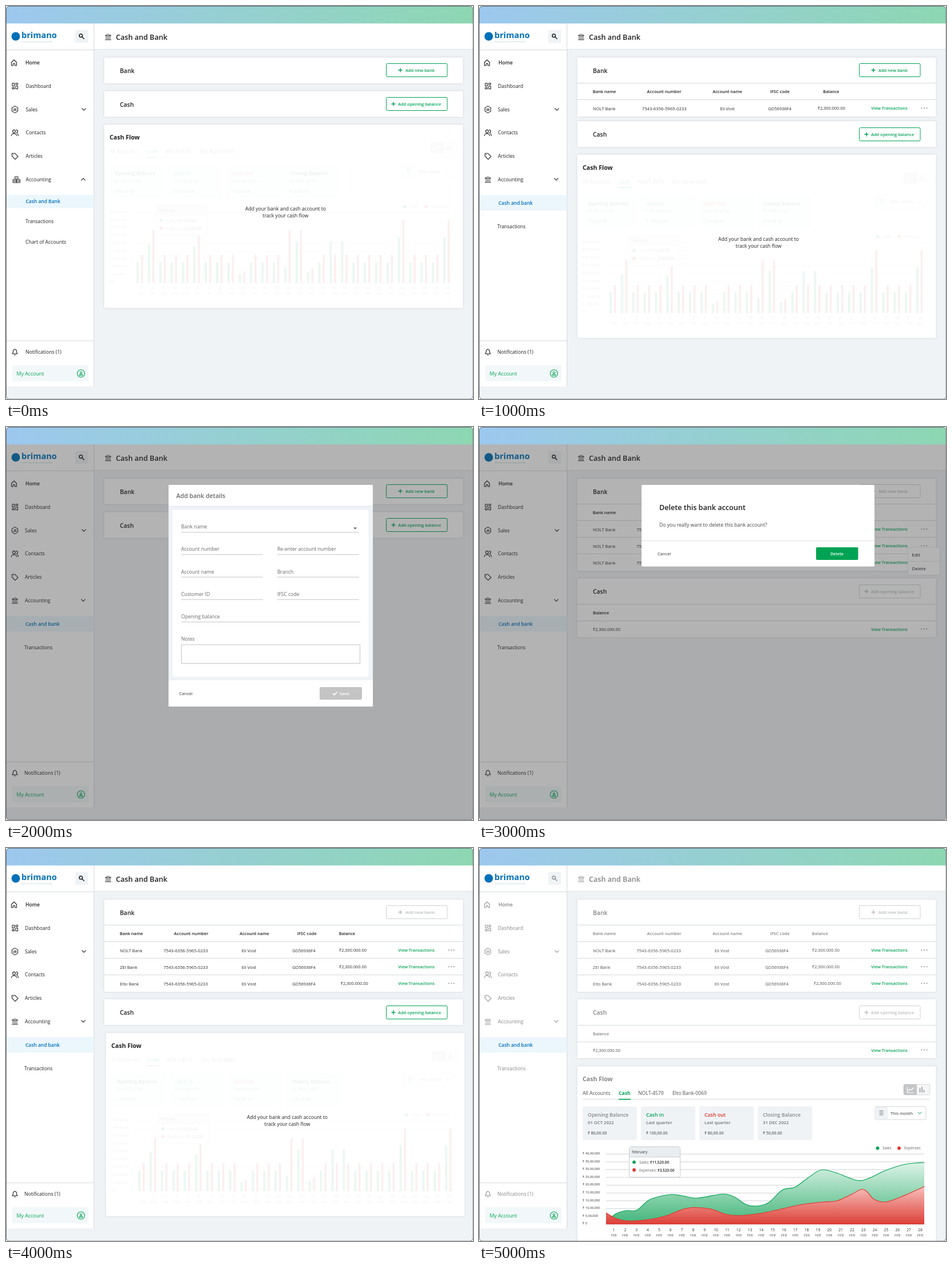
Recreate the animation shown at these times as an HTML page. Size 816 px wide and 686 px high, loop 6000 ms.

```html
<!DOCTYPE html>
<html lang="en">
<head>
<meta charset="utf-8">
<title>Cash and Bank</title>
<style>
html, body { margin: 0; width: 100%; height: 100%; overflow: hidden; background: #fff; }
svg { display: block; width: 816px; height: 686px; font-family: "Open Sans", "Noto Sans", sans-serif; }
.scene { --ink: #1f1f1f; --body: #2c2c2c; --line: #1f1f1f; }
.pale { --ink: #858585; --body: #505050; --line: #959595; }
.card { fill: #fff; filter: drop-shadow(0 .5px 1.5px rgba(40, 60, 80, .2)); }
.icon { fill: none; stroke: var(--line); stroke-width: 1.1; stroke-linejoin: round; stroke-linecap: round; }
</style>
</head>
<body>
<svg id="stage" viewBox="0 0 816 686">
  <defs>
    <linearGradient id="top"><stop stop-color="#9dc8ef"/><stop offset="1" stop-color="#8dd7b2"/></linearGradient>
    <linearGradient id="sales" gradientUnits="userSpaceOnUse" x1="0" y1="168" x2="0" y2="268">
      <stop stop-color="#dcf3e7"/><stop offset="1" stop-color="#4cb981"/>
    </linearGradient>
    <linearGradient id="spend" gradientUnits="userSpaceOnUse" x1="0" y1="208" x2="0" y2="276">
      <stop stop-color="#f7c4c0"/><stop offset="1" stop-color="#dc3f36"/>
    </linearGradient>
  </defs>
</svg>
<script>
const GREEN = '#00a353', RED = '#e1342d', BLUE = '#0070b8', INK = 'var(--ink)', BODY = 'var(--body)';
const BG = '#f0f3f6', LINE = '#d5d9dc', OFF = '#b9bcbe';
const BANKS = ['NOLT Bank', 'ZEI Bank', 'Elto Bank'];
const STEP = 1000;

const text = (x, y, s, size = 8.6, fill = INK, weight = 400, anchor = 'start') =>
  `<text x="${x}" y="${y + size * .36}" font-size="${size}" fill="${fill}" font-weight="${weight}" text-anchor="${anchor}">${s}</text>`;
const mid = (x, y, s, size, fill, weight) => text(x, y, s, size, fill, weight, 'middle');
const rect = (x, y, w, h, fill, more = '') => `<rect x="${x}" y="${y}" width="${w}" height="${h}" fill="${fill}" ${more}/>`;
const card = (x, y, w, h) => rect(x, y, w, h, '#fff', 'rx="1.5" class="card"');
const rule = (x, y, w, color = LINE) => rect(x, y - .5, w, 1, color);
const dot = (x, y, r, fill) => `<circle cx="${x}" cy="${y}" r="${r}" fill="${fill}"/>`;
const path = (d, stroke, width = 1.2, fill = 'none') =>
  `<path d="${d}" fill="${fill}" stroke="${stroke}" stroke-width="${width}" stroke-linecap="round" stroke-linejoin="round"/>`;
const list = (n, f) => Array.from({ length: n }, (_, i) => f(i)).join('');

// Icon paths are centred on 0,0.
const ICONS = {
  home: 'M-4.5 -.5 0-5 4.5-.5V5H1.5V1.5H-1.5V5H-4.5Z',
  grid: 'M-4.5-5H-1V0H-4.5ZM1.5-5H5V-2.5H1.5ZM1.5 0H5V5H1.5ZM-4.5 2.5H-1V5H-4.5Z',
  sales: 'M0-6 5-3V3L0 6-5 3V-3ZM-2 2V0M0 2V-2M2 2V-1',
  people: 'M-1.5-5a2.4 2.4 0 1 1 0 4.8a2.4 2.4 0 1 1 0-4.8M-6 5C-6 0 3 0 3 5M2.5-5a2.4 2.4 0 0 1 0 4.8M4 1Q6 2.5 6 5',
  tag: 'M-5-5H0L5.5.5 .5 5.5-5 0ZM-2.6-2.6h.1',
  bank: 'M-5-2.5 0-5 5-2.5ZM-5 5H5M-3.5-2V4.5M-1.2-2V4.5M1.2-2V4.5M3.5-2V4.5',
  coins: 'M-2.5-5.5H2.5V-.5H-2.5ZM-6-.5H0V5.5H-6ZM0-.5H6V5.5H0ZM-2.5-3H2.5M-6 1.5H6M-6 3.5H6',
  bell: 'M-4.5 3Q-3 2-3-1.5a3 3 0 0 1 6 0Q3 2 4.5 3ZM-1 5H1M0-4.5V-5.2',
  search: 'M-1.2-4a2.8 2.8 0 1 1 0 5.6a2.8 2.8 0 1 1 0-5.6M1 1 4.3 4.3',
  user: 'M0-6.5a6.5 6.5 0 1 1 0 13a6.5 6.5 0 1 1 0-13M0-3a1.6 1.6 0 1 1 0 3.2a1.6 1.6 0 1 1 0-3.2M-3 3.2Q-3 1.2 0 1.2T3 3.2Z',
  down: 'M-3.3-1.6 0 1.7 3.3-1.6',
  up: 'M-3.3 1.6 0-1.7 3.3 1.6',
  plus: 'M-3 0H3M0-3V3'
};
const FINE = 'stroke-width:.8';
const icon = (name, x, y, style = '') =>
  `<path class="icon" d="${ICONS[name]}" transform="translate(${x} ${y})" style="${style}"/>`;

function sidebar(first) {
  const x = first ? 34.5 : 33;
  const rows = [['home', 'Home'], ['grid', 'Dashboard'], ['sales', 'Sales'], ['people', 'Contacts'], ['tag', 'Articles'],
    [first ? 'coins' : 'bank', 'Accounting', FINE]];
  const menu = rows.map(([pic, name, style], i) => {
    const y = 99 + i * 40.8;
    return icon(pic, i ? (pic === 'coins' ? 18.5 : 15.5) : 14, y, style) +
      text(i ? x : 34, y, name, 8.6, INK, i ? 400 : 600);
  }).join('');
  const sub = first
    ? rect(1, 329.5, 152.5, 23, '#ebf6fd') + text(34.5, 341.3, 'Cash and Bank', 8.45, BLUE, 600) +
      text(34, 375.5, 'Transactions', 8.4) + text(34, 412, 'Chart of Accounts')
    : rect(1, 330, 152.5, 27, '#ebf6fd') + text(34, 343.8, 'Cash and bank', 8.45, BLUE, 600) +
      text(32, 384.8, 'Transactions', 8.4);
  return rect(1, 30, 152.5, 634, '#fff') + rect(153.3, 30, 1, 634, LINE) +
    dot(17, 53, 7.5, BLUE) + text(27, 50.5, 'brimano', 14.5, BLUE, 700) +
    text(27, 62, 'Handy accounts for every growing small trader', 2.5, '#4d9b96') +
    rect(121, 42, 22.5, 22.5, BG, 'rx="2"') + icon('search', 132, 53, 'stroke-width:1.5') +
    rule(1, 76.5, 152.5) + menu + icon('down', 136, 180.5) +
    icon(first ? 'up' : 'down', 135, 302.5) + sub + rule(1, 584.5, 152.5) +
    icon('bell', 15.5, 604) + text(first ? 34 : 32, 604, 'Notifications (1)') +
    rect(11, 627, 133, 28, '#f2f8f9', 'rx="2"') + text(18.5, 642, 'My Account', 8.8, GREEN, 500) +
    icon('user', 131, 641.5, `stroke:${GREEN}`);
}

function shell(first) {
  return rect(0, 30, 816, 656, BG) + rect(154, 30, 662, 45, '#fff') + rule(154, 75.5, 662, '#dfe3e6') +
    icon('bank', 178.5, 54, FINE) + text(192, 54.3, 'Cash and Bank', 12.6, INK, 600) + sidebar(first);
}

function button(x, y, label, on) {
  const color = on ? GREEN : OFF, wide = label.length > 12;
  return rect(x + .5, y + .5, 106.5, 23, '#fff', `rx="2" stroke="${on ? GREEN : '#cfd2d4'}"`) +
    icon('plus', x + (wide ? 13 : 25), y + 12, `stroke:${color};stroke-width:1.4`) +
    text(x + (wide ? 21 : 34), y + 12.4, label, 7.45, color, 600);
}

const more = y => [773.5, 778, 782.5].map(x => dot(x, y, 1, '#8d9194')).join('');
const view = y => mid(717, y, 'View Transactions', 7.35, GREEN, 600) + more(y - .5);
const sumText = (x, y) => mid(x, y, '₹2,300.000.00', 7.4, BODY);

function bank(rows, names, add) {
  const one = rows === 1, head = (x, s) => mid(x, 149.8, s, 7.45, INK, 600);
  let out = card(171.5, 90, 627, rows ? 74 + rows * 29 : 45) + text(199, 113.5, 'Bank', 10.4, INK, 600) +
    button(664, 100, 'Add new bank', add);
  if (!rows) return out;
  out += rule(171.5, 134.5, 627) + head(219, 'Bank name') + head(323.5, 'Account number') +
    head(434, 'Account name') + head(525.7, 'IFSC code') + head(one ? 615.5 : 596, 'Balance');
  return out + list(rows, i => {
    const y = 178.8 + i * 29;
    return rule(171.5, 163.5 + i * 29, 627) + text(199, y, names[i], 7.6, BODY) +
      mid(one ? 323.7 : 314, y, '7543-6356-5965-0233', 7.7, BODY) +
      mid(one ? 434 : 424.5, y, 'Eli Vost', 7.7, BODY) + mid(one ? 525.5 : 520.5, y, 'GD56936F4', 7.5, BODY) +
      sumText(one ? 615.7 : i === 2 ? 608.7 : 606, y) + view(y);
  });
}

function cash(y, open, add) {
  let out = card(171.5, y, 627, open ? 103 : 45) + text(199, y + 23.7, 'Cash', 10.4, INK, 600) +
    button(664, Math.round(y + 10.6), 'Add opening balance', add);
  if (open) out += rule(171.5, y + 45.5, 627) + text(199, y + 60.3, 'Balance', 7.45, INK, 600) +
    rule(171.5, y + 74.5, 627) + text(199, y + 89, '₹2,300.000.00', 7.4, BODY) + view(y + 89);
  return out;
}

// Catmull-Rom spline through the points.
function curve(p) {
  return p.slice(1).reduce((d, c, i) => {
    const a = p[i - 1] || p[i], b = p[i], e = p[i + 2] || c;
    return d + `C${b[0] + (c[0] - a[0]) / 6} ${b[1] + (c[1] - a[1]) / 6} ${c[0] - (e[0] - b[0]) / 6} ${c[1] - (e[1] - b[1]) / 6} ${c}`;
  }, 'M' + p[0]);
}
const SALES = [[222, 272], [238, 258], [256, 252], [276, 251], [298, 233], [333, 224], [355, 226], [382, 230], [425, 223],
  [446, 228], [466, 241], [485, 244], [506, 238], [530, 216], [552, 211], [576, 194], [598, 181], [624, 186], [660, 199],
  [680, 196], [710, 182], [745, 171], [778, 168]];
const SPEND = [[222, 256], [240, 266], [262, 270], [300, 267], [330, 260], [355, 250], [375, 246.5], [405, 249], [430, 258],
  [455, 260.5], [490, 257], [520, 251], [560, 242], [600, 237], [625, 235], [650, 224], [668, 215], [678, 219],
  [690, 232], [710, 237], [735, 229], [778, 210]];

function area(points, fill, color) {
  const d = curve(points);
  return `<path d="${d}V276H222Z" fill="url(#${fill})"/>` + path(d, color, 1.1);
}

// Days whose bars differ from the usual 36 / 49.
const BARS = { 2: [68, 93], 6: [64, 82], 10: [16, 20], 14: [27, 92], 15: [73, 92], 16: [19, 25], 18: [73, 49], 19: [73, 49],
  24: [80, 109], 28: [80, 109] };
const bars = () => list(28, i => {
  const [g, r] = BARS[i + 1] || [36, 49], x = 228 + i * 19.85;
  return rect(x, 276.5 - g, 4, g, GREEN) + rect(x + 7.8, 276.5 - r, 3.6, r, RED);
});

function flowBody(live) {
  const cards = [['Opening Balance', '01 OCT 2022', '₹ 80,00.00', INK], ['Cash In', 'Last quarter', '₹ 100,00.00', GREEN],
    ['Cash out', 'Last quarter', '₹ 80,00.00', RED], ['Closing Balance', '31 DEC 2022', '₹ 50,00.00', INK]];
  const scale = [40, 35, 30, 25, 20, 15, 10, 10, 5, 0];
  return text(181, 47, 'All Accounts', 8.6, BODY) + text(244, 47, 'Cash', 8.6, GREEN, 700) +
    text(278, 47, 'NOLT-4579', 8.7, BODY) + text(338, 47, 'Elto Bank-0069', 8.6, BODY) +
    rule(181, 57.5, 607) + rect(244, 56.8, 21, 1.7, GREEN) +
    rect(742, 31.5, 46, 18.5, '#f4f5f6', 'rx="2" stroke="#cfd2d4" stroke-width=".8"') +
    rect(742, 31.5, 23, 18.5, '#c3c5c7', 'rx="2"') +
    path('M748.5 36V46H759M750 43l3-3 2.5 1.5 4-4', '#fff') + path('M770.5 45V39M774 45V36.5M777.5 45V42', '#a4a7a9', 1.8) +
    cards.map(([name, when, sum, color], i) => {
      const x = 181 + i * 102;
      return rect(x, 70, 95, 59, BG, 'rx="3"') + text(x + 9, 85, name, 8.75, color, 600) +
        text(x + 9, 98, when, 7.7, '#6e7276', 600) + text(x + 9, 116, sum, 7, '#333');
    }).join('') +
    rect(692, 70.5, 89, 22.5, '#fff', 'rx="2" stroke="#d3d7da"') + rect(692.5, 71, 22, 21.5, BG) +
    path('M700 77.5H706M700 80H706M700 82.5H706M700 85H706', '#777', .9) +
    text(719, 82, 'This month', 7.4, '#333') + icon('down', 770, 81.5, `stroke:${GREEN};stroke-width:1`) +
    dot(696.5, 143, 2.9, GREEN) + text(705, 143, 'Sales', 6.5, '#666') +
    dot(734, 143, 2.9, RED) + text(743, 143, 'Expenses', 6.5, '#666') +
    scale.map((n, i) => {
      const y = 152 + i * 13.6;
      return text(181, y, n ? `₹ ${n},00,000` : '₹ 0', 5.7, '#333') + rule(222, y + 1.2, 556, '#cfd2d4');
    }).join('') +
    (live ? area(SALES, 'sales', GREEN) + area(SPEND, 'spend', RED) : bars()) +
    list(28, i => mid(235.5 + i * 19.83, 285.5, i + 1, 6.7, '#333') + mid(235.5 + i * 19.83, 294.7, 'FEB', 6.1, '#555')) +
    rect(262.5, 140.5, 89, 53, '#fff', 'rx="3" stroke="#c6cbcf"') + rect(263, 141, 88, 17, '#eaeef1', 'rx="2.5"') +
    rule(263, 158.3, 88, '#c6cbcf') + text(267, 149.7, 'February', 6.5, '#333') +
    dot(271, 167.3, 2.9, GREEN) + text(280, 167.5, 'Sales: <tspan fill="#222" font-weight="600">₹11,520.00</tspan>', 6.5, '#666') +
    dot(271, 181, 2.9, RED) + text(280, 181.2, 'Expenses: <tspan fill="#222" font-weight="600">₹3,520.00</tspan>', 6.5, '#666');
}

function flow(dx, y, live) {
  const note = live ? '' : mid(488.5, 147.3, 'Add your bank and cash account to') + mid(488.5, 159.3, 'track your cash flow');
  return `<g transform="translate(${dx} ${y})">` + card(171.5, 0, 627, 320) + text(181, 22.5, 'Cash Flow', 10.6, INK, 700) +
    `<g opacity="${live ? 1 : .07}">${flowBody(live)}</g>${note}</g>`;
}

const dim = () => rect(0, 30, 816, 656, 'rgba(50,50,50,.37)');

function addModal() {
  const gray = '#666';
  const field = (x, y, w, s) => text(x, y, s, 8.6, gray) + rule(x, y + 9.5, w, '#c4c4c4');
  return rect(284, 101, 357, 387, '#fff', 'rx="1"') + text(297.5, 120.3, 'Add bank details', 10.65, gray, 600) +
    rect(284, 138, 357, 304, '#eff3f7') + rule(284, 138.5, 357, '#dfe3e6') + rect(291, 145, 342.5, 291, '#fff') +
    field(306, 174.3, 311, 'Bank name') + '<path d="M607 175.5h6l-3 3z" fill="#555"/>' +
    field(306, 213.3, 143, 'Account number') + field(474, 213.3, 143, 'Re-enter account number') +
    field(306, 252.5, 143, 'Account name') + field(474, 252.5, 143, 'Branch') +
    field(306, 291.7, 143, 'Customer ID') + field(474, 291.7, 143, 'IFSC code') +
    field(306, 330.8, 313, 'Opening balance') + text(306, 370, 'Notes', 8.6, gray) +
    rect(306.5, 380, 312, 32.5, '#fff', 'stroke="#c4c4c4"') +
    text(302.5, 465.5, 'Cancel', 7.6, '#333') + rect(548, 454, 74, 22, '#c4c4c4', 'rx="2"') +
    path('M571.5 465.5l2.2 2.3 4.3-4.8', '#fff', 1.7) + text(583, 465.5, 'Save', 7.5, '#fff', 600);
}

function deleteModal() {
  return rect(284, 101, 407, 142.5, '#fff', 'rx="2"') + text(315, 140, 'Delete this bank account', 12.6, INK, 600) +
    text(315, 171, 'Do you really want to delete this bank account?', 8.6, '#444') + rule(284, 198.5, 407, '#dfe3e6') +
    text(312, 221.5, 'Cancel', 7.6, '#333') + rect(589, 210, 73.5, 22, GREEN, 'rx="2"') +
    mid(625.5, 221.5, 'Delete', 7.4, '#fff', 600);
}

const popup = () => card(750, 210.5, 55, 47.5) + rule(750, 234.5, 55, '#e3e6e8') +
  text(756.5, 223, 'Edit', 8) + text(756.5, 247, 'Delete', 8);

const scenes = [
  () => shell(true) + bank(0, [], true) + cash(148.5, false, true) + flow(0, 207, false),
  () => shell() + bank(1, BANKS, true) + cash(201, false, true) + flow(0, 259.5, false),
  () => shell() + bank(0, [], true) + cash(148.5, false, true) + dim() + addModal(),
  () => shell() + bank(3, Array(3).fill(BANKS[0]), false) + cash(264, true, false) + popup() + dim() + deleteModal(),
  () => shell() + bank(3, BANKS, false) + cash(264, false, true) + flow(3, 322.7, false),
  () => shell() + bank(3, BANKS, false) + cash(264, true, false) + flow(0, 381, true)
];

const stage = document.getElementById('stage');
stage.insertAdjacentHTML('beforeend',
  scenes.map((draw, i) => `<g class="scene${i === 5 ? ' pale' : ''}" display="none">${draw()}</g>`).join('') +
  rect(0, 0, 816, 30.5, 'url(#top)') +
  '<path d="M0 0H816V686H0ZM6 .5Q.5 .5 .5 6V680Q.5 686 6 686H810Q816 686 816 680V6Q816 .5 810 .5Z" fill="#fff" fill-rule="evenodd"/>' +
  rect(.5, .5, 815.6, 685.6, 'none', 'rx="5.5" stroke="#56636d" stroke-width=".9"'));
const groups = [...stage.querySelectorAll('.scene')];
let shown = -1;

function show(time) {
  const now = Math.floor(time / STEP) % scenes.length;
  if (now === shown) return;
  groups.forEach((g, i) => g.setAttribute('display', i === now ? 'inline' : 'none'));
  shown = now;
}

const start = performance.now();
function tick() {
  show(performance.now() - start);
  requestAnimationFrame(tick);
}
tick();
</script>
</body>
</html>
```
